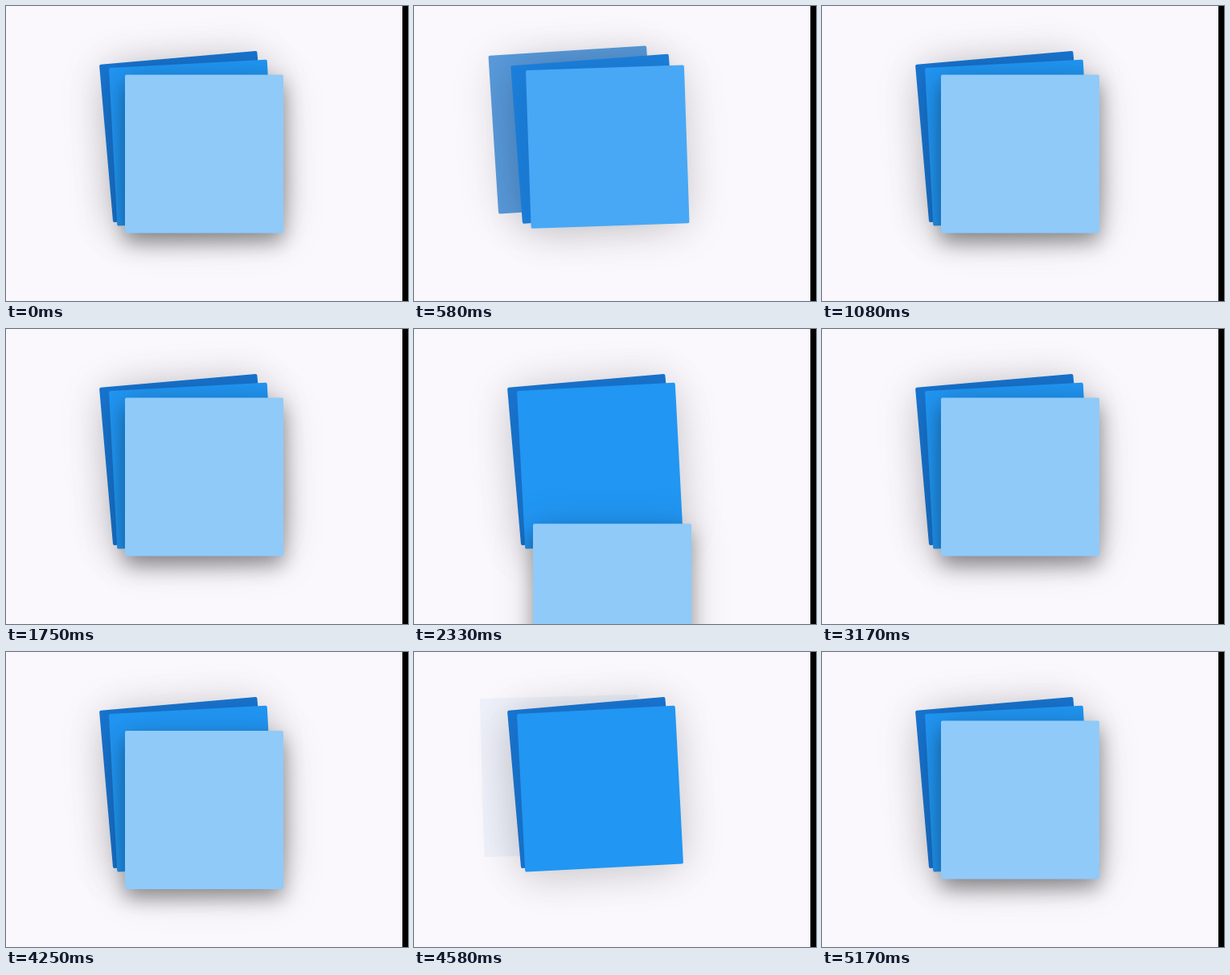
An HTML page with a canvas that plays this animation: 500 by 367 pixels, repeating every 5.26 s.

```html
<!DOCTYPE html>
<html lang="en">
<head>
<meta charset="utf-8">
<title>Card stack</title>
<style>
  html, body { margin: 0; width: 100%; height: 100%; overflow: hidden; background: #faf8fc; }
  canvas { display: block; }
</style>
</head>
<body>
<canvas id="stage" width="500" height="367"></canvas>
<script>
const ctx = document.getElementById('stage').getContext('2d');

const LOOP = 5260, STEP = 83.34;
const FIRST = 65, PERIOD = 2055, CYCLES = 3;
const SIZE = 197, AWAY = 2000;

// Resting places, front to back, then the place where a new card enters.
const slots = [
  { x: 246.5, y: 184, rot: 0, rgb: [144, 202, 249] },
  { x: 231.5, y: 170.2, rot: -3, rgb: [33, 150, 243] },
  { x: 222.7, y: 162.5, rot: -5, rgb: [25, 118, 210] },
  { x: 183, y: 153.8, rot: -1.6, rgb: [25, 118, 210] }
];

const mix = (a, b, p) => a + (b - a) * p;
const ramp = (t, start, length) => Math.min(1, Math.max(0, (t - start) / length));
const smooth = p => p * p * (3 - 2 * p);

function between(a, b, px, py, pr, pc) {
  return {
    x: mix(a.x, b.x, px),
    y: mix(a.y, b.y, py),
    rot: mix(a.rot, b.rot, pr),
    rgb: a.rgb.map((v, i) => Math.round(mix(v, b.rgb[i], pc)))
  };
}

function fillCard(card, dx) {
  ctx.save();
  ctx.translate(card.x + dx, card.y);
  ctx.rotate(card.rot * Math.PI / 180);
  ctx.beginPath();
  ctx.roundRect(-SIZE / 2, -SIZE / 2, SIZE, SIZE, 2);
  ctx.fill();
  ctx.restore();
}

// Only the shadow lands on the stage; the shape itself stays outside.
function shadow(card, dy, blur, alpha) {
  if (alpha <= 0) return;
  ctx.save();
  ctx.shadowColor = `rgba(0,0,0,${alpha})`;
  ctx.shadowBlur = blur;
  ctx.shadowOffsetX = AWAY;
  ctx.shadowOffsetY = dy;
  ctx.fillStyle = '#000';
  fillCard(card, -AWAY);
  ctx.restore();
}

function drawCard(card, lift = 0, alpha = 1) {
  if (alpha <= 0) return;
  shadow(card, 5, 56, 0.13 * alpha);
  shadow(card, 11, 24, 0.36 * lift);
  ctx.globalAlpha = alpha;
  ctx.fillStyle = `rgb(${card.rgb})`;
  fillCard(card, 0);
  ctx.globalAlpha = 1;
}

function drawStack(u) {
  const [front, middle, back, entry] = slots;
  const p = smooth(ramp(u, 446, 180));
  const quick = smooth(ramp(u, 450, 118));

  drawCard(between(entry, back, p, p ** 4, quick, p), 0, ramp(u, 400, 170));
  drawCard(between(back, middle, p, p, p, p));
  drawCard(between(middle, front, quick, p, p, p), smooth(ramp(u, 500, 420)));

  const drop = 154 * (u / 212) ** 2.42;
  if (drop < 400) drawCard({ ...front, y: front.y + drop }, 1);
}

function render(time) {
  const t = Math.floor((time % LOOP + 5) / STEP) * STEP;
  const cycle = Math.min(CYCLES - 1, Math.floor((t - FIRST) / PERIOD));
  const u = Math.max(0, t - FIRST - cycle * PERIOD);

  ctx.fillStyle = '#faf8fc';
  ctx.fillRect(0, 0, 500, 367);
  drawStack(t < FIRST ? 0 : u);
  ctx.fillStyle = '#000';
  ctx.fillRect(493, 0, 7, 367);
}

const begin = performance.now();
function tick() {
  render(performance.now() - begin);
  requestAnimationFrame(tick);
}
tick();
</script>
</body>
</html>
```
